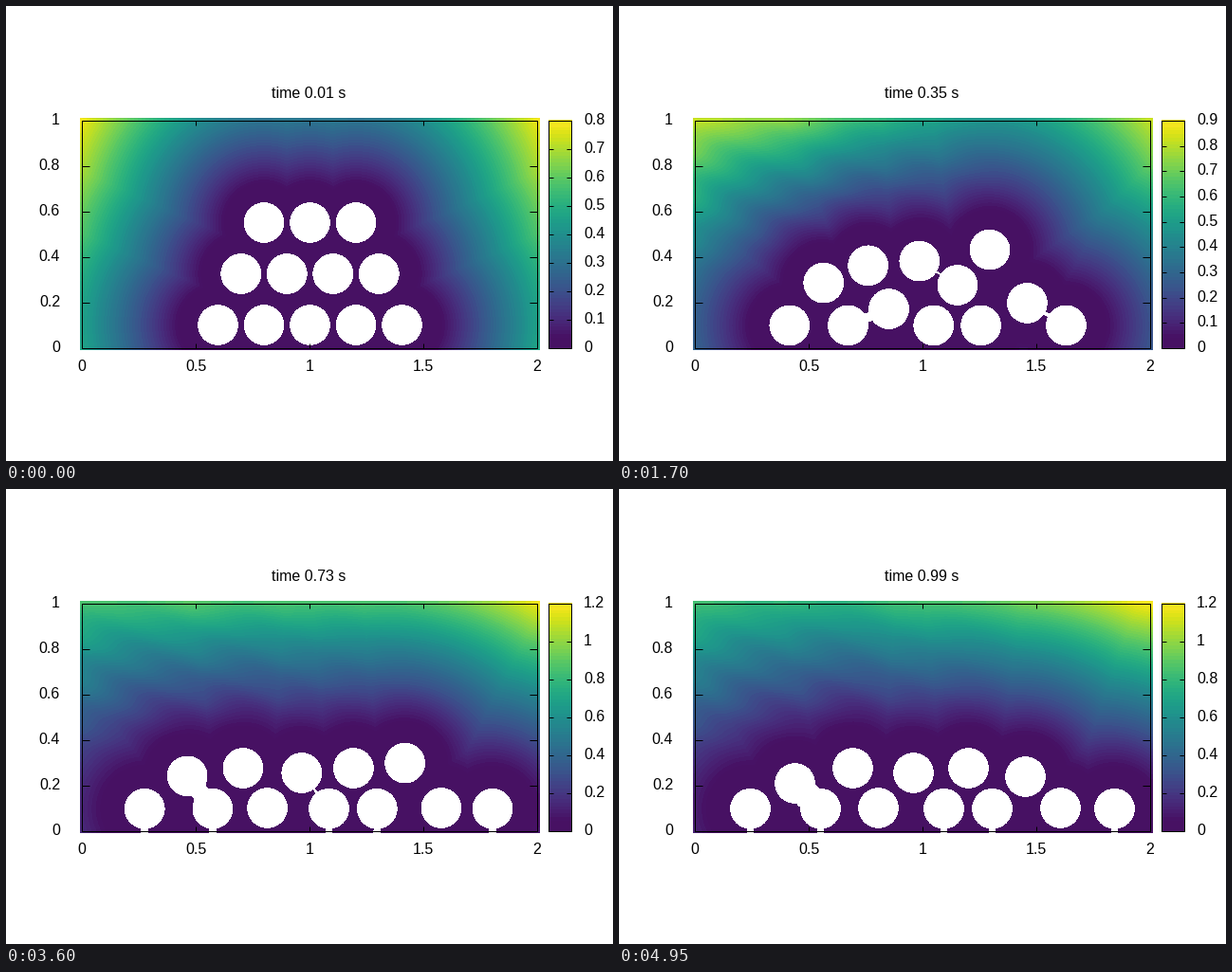
Write a matplotlib script that moves like this. It is 640 px wide and 480 px high and loops after 5 s.

```python
import numpy as np
import matplotlib.pyplot as plt
from matplotlib.animation import FuncAnimation
from matplotlib.collections import LineCollection
from matplotlib.colors import ListedColormap
from matplotlib.patches import Rectangle

plt.rcParams["font.family"] = "Liberation Sans"

FRAMES = 100
SCALE = 240          # pixels per unit length
LEFT, RIGHT, TOP, BOTTOM = 80, 560, 120, 360
BAR_L, BAR_R = 572, 596
PAD = 2              # the map reaches this far past its border
RADIUS = 0.089
TEXT_SIZE = 16 * 0.72
LINE = 0.72

# Resting place (pixels) and fall time (share of the loop) of every disc.
BOTTOM_ROW = [(x, 336.8, 0.6) for x in (138, 212, 342, 393, 522)]
MIDDLE_ROW = [(185, 310, 1), (273, 336, 0.5), (368, 294, 0.2), (465, 336, 0.6)]
TOP_ROW = [(246, 294, 0.5), (310, 299, 0.6), (428, 303, 0.9)]
ROWS = (BOTTOM_ROW, MIDDLE_ROW, TOP_ROW)

px = np.arange(LEFT - PAD, RIGHT + PAD + 1)
py = np.arange(TOP - PAD, BOTTOM + PAD + 1)
X, Y = np.meshgrid(np.clip((px - LEFT) / SCALE, 0, 2),
                   np.clip((BOTTOM - py) / SCALE, 0, 1))
LIFT = Y ** (3 - 1.2 * (X / 2) ** 4)
SWELL = (0.08 + 0.1875 * X) * LIFT
LOBE = 0.15 * np.exp(-((X - 0.45) / 0.4) ** 2) * LIFT
STREAKS = (0.025 * np.sin(np.pi * np.clip((Y - 0.3) / 0.8, 0, 1))
           * np.clip(1 - X / 1.6, 0, 1)
           * np.sin(2 * np.pi * (Y + 0.55 * X) / 0.2))


def discs(t):
    """Centres at time t: a stacked pile that spreads sideways and drops."""
    for level, row in enumerate(ROWS):
        spread = np.sin(np.pi / 2 * t) ** (1.5 if level == 2 else 1)
        y0 = 336 - 54 * level
        for k, (x1, y1, fall) in enumerate(row):
            x0 = 320 + 48.5 * (k - (len(row) - 1) / 2)
            x = x0 + (x1 - x0) * spread
            y = y0 + (y1 - y0) * min(1, t / fall)
            yield (x - LEFT) / SCALE, (BOTTOM - y) / SCALE


def field(t):
    """Field values per pixel, masked inside discs and at their contacts."""
    near = np.full(X.shape, 9.0)
    second = near.copy()
    for cx, cy in discs(t):
        dist = np.sqrt((X - cx) ** 2 + (Y - cy) ** 2) - RADIUS
        second = np.minimum(second, np.maximum(near, dist))
        near = np.minimum(near, dist)

    base = np.maximum(near - 0.05, 0)
    extra = (SWELL * np.sin(np.pi / 2 * t / 0.88) ** 4
             + LOBE * np.sin(np.pi * t)
             + STREAKS * min(1, t / 0.45))
    value = np.maximum(base + extra * np.minimum(1, base / 0.2), 0)
    hole = (near < 0) | (near + second < 0.02) | (near + Y < 0.009)
    return np.ma.array(value, mask=hole)


def bar_scale(peak):
    step = 0.1 if peak <= 1 else 0.2
    return step, int(np.ceil(peak / step - 1e-9))


def side_ticks(y, left, right, size):
    return [[(left, y), (left + size, y)], [(right - size, y), (right, y)]]


fig = plt.figure(figsize=(6.4, 4.8), dpi=100, facecolor="white")
ax = fig.add_axes([0, 0, 1, 1])
ax.axis("off")
levels = np.clip(np.linspace(0, 1, 64), 0.045, 0.985)
cmap = ListedColormap(plt.get_cmap("viridis")(levels))


def show(data, left, right, top, bottom):
    """Place an image so that it covers these pixels, ends included."""
    return ax.imshow(data, cmap=cmap, aspect="auto", interpolation="nearest",
                     zorder=1, extent=(left, right + 1, bottom, top - 1))


image = show(field(0), LEFT - PAD, RIGHT + PAD, TOP - PAD, BOTTOM + PAD)
show(np.linspace(1, 0, 64)[:, None], BAR_L, BAR_R, TOP, BOTTOM)
# Whole numbers snap to pixel columns and rows counted from the top left.
ax.set_xlim(0, 640)
ax.set_ylim(479, -1)


def label(x, y, text, align):
    return ax.text(x, y, text, ha=align, va="baseline", size=TEXT_SIZE)


for x0, x1 in ((LEFT, RIGHT), (BAR_L, BAR_R)):
    ax.add_patch(Rectangle((x0, TOP), x1 - x0, BOTTOM - TOP, fill=False,
                           ec="black", lw=LINE, zorder=3))

axis_ticks = []
for k in range(5):
    x = LEFT + 120 * k
    axis_ticks += [[(x, TOP), (x, TOP + 5)], [(x, BOTTOM), (x, BOTTOM - 5)]]
    label(x, 384, f"{k / 2:g}", "center")
for k in range(6):
    y = BOTTOM - 48 * k
    axis_ticks += side_ticks(y, LEFT, RIGHT, 8)
    label(57, y + 4, f"{k / 5:g}", "right")
ax.add_collection(LineCollection(axis_ticks, colors="black", linewidths=LINE,
                                 zorder=3), autolim=False)

bar_ticks = LineCollection([], colors="black", linewidths=LINE, zorder=3)
ax.add_collection(bar_ticks, autolim=False)
bar_labels = [label(609, 0, "", "left") for _ in range(12)]
title = label(279.5, 96, "", "left")


def draw(i):
    value = field(i / (FRAMES - 1))
    step, count = bar_scale(value.max())
    image.set_data(value)
    image.set_clim(0, step * count)
    title.set_text(f"time {0.0135 + 0.0099 * i:.2f} s")

    segments = []
    for k, text in enumerate(bar_labels):
        text.set_visible(k <= count)
        if k <= count:
            y = round(BOTTOM - (BOTTOM - TOP) * k / count)
            segments += side_ticks(y, BAR_L, BAR_R, 5)
            text.set_position((609, y + 4))
            text.set_text(f"{k * step:g}")
    bar_ticks.set_segments(segments)
    return [image, title, bar_ticks, *bar_labels]


anim = FuncAnimation(fig, draw, frames=FRAMES, interval=50, repeat=True,
                     repeat_delay=0)
plt.show()
```
